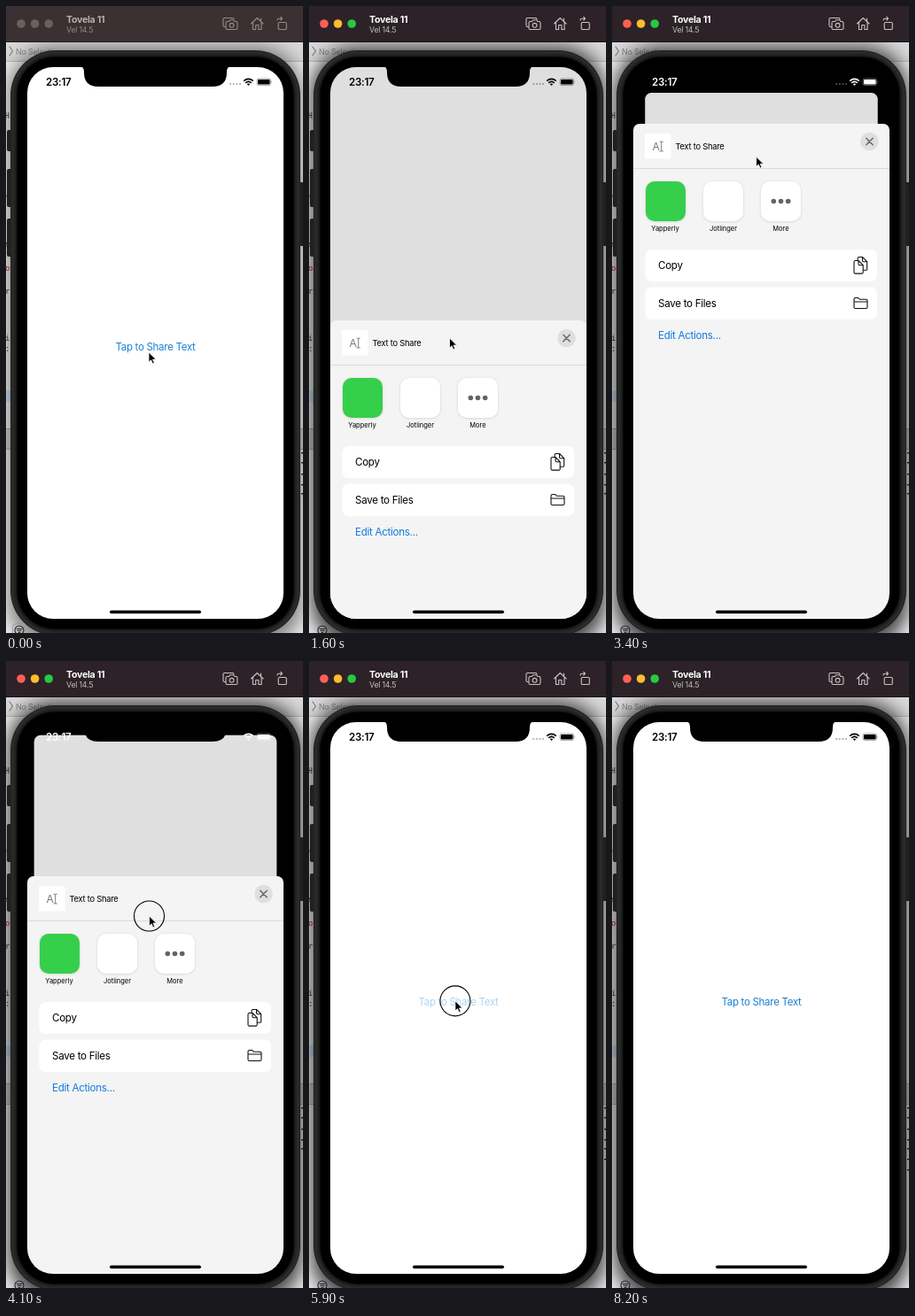
An HTML page for the animation above (8600 ms loop, 335x708 px).

```html
<!DOCTYPE html>
<html lang="en">
<head>
<meta charset="utf-8">
<title>Share sheet</title>
<style>
html, body { margin: 0; width: 100%; height: 100%; overflow: hidden; background: #ddd; }
svg { display: block; width: 335px; height: 708px; }
text { font-family: Inter, Roboto, sans-serif; letter-spacing: -.025em; }
.code text { font: 9px "DejaVu Sans Mono", monospace; fill: #333; }
.line { fill: none; stroke-width: 1.1; stroke-linejoin: round; stroke-linecap: round; }
.row { font-size: 11.6px; }
.label { font-size: 7.5px; text-anchor: middle; letter-spacing: 0; }
</style>
</head>
<body>
<svg viewBox="0 0 335 708">
  <defs>
    <clipPath id="screen"><rect x="24" y="69" width="289" height="623" rx="29"/></clipPath>
    <filter id="blur" x="-20%" y="-20%" width="140%" height="140%"><feGaussianBlur stdDeviation="10"/></filter>
    <filter id="soft" x="-20%" y="-20%" width="140%" height="140%"><feGaussianBlur stdDeviation="1.3"/></filter>
  </defs>

  <!-- editor behind the phone -->
  <g class="code">
    <rect width="335" height="708" fill="#efefef"/>
    <rect y="41" width="335" height="21" fill="#d8d8d8"/>
    <path d="M0 62.5H335" stroke="#bbb"/>
    <path d="M4 46l3.5 5-3.5 5" class="line" stroke="#777"/>
    <text x="11" y="55" style="font:9px Inter,sans-serif;fill:#888">No Selection</text>
    <text x="-1" y="127" style="font-size:8px">H</text>
    <text x="-1" y="219">t</text>
    <text x="-1" y="272">s</text>
    <text x="-1" y="299" style="fill:#c3201c">o</text>
    <text x="-1" y="325">r</text>
    <text x="-1" y="378">i</text>
    <text x="-1" y="390">:</text>
    <rect y="434" width="8" height="13" fill="#cfe0f2"/>
    <rect y="477" width="335" height="24" fill="#d2d2d2"/>
    <path d="M0 477.5H335M0 500.5H335" stroke="#aaa"/>
  </g>
  <rect id="shade" x="2" y="46" width="333" height="678" rx="52" filter="url(#blur)"/>
  <g id="logs" fill="#111"></g>
  <circle cx="15" cy="705" r="5" class="line" stroke="#222"/>
  <path d="M12.3 703.5h5.4M13 705.5h4M14 707.5h2" class="line" stroke="#222"/>
  <rect id="field" x="7.5" y="697.5" width="60" height="15" rx="4" fill="none" stroke="#999"/>

  <!-- phone body -->
  <g fill="#202020">
    <rect x="1" y="140" width="7" height="24" rx="2"/>
    <rect x="1" y="184" width="7" height="43" rx="2"/>
    <rect x="1" y="240" width="7" height="43" rx="2"/>
    <rect x="329" y="199" width="7" height="72" rx="2"/>
  </g>
  <rect x="5" y="50" width="327" height="661" rx="51" fill="#242424"/>
  <rect x="7.5" y="52.5" width="322" height="656" rx="48.5" fill="none" stroke="#2c2c2c" stroke-width="2"/>
  <rect x="12" y="57" width="313" height="647" rx="43" filter="url(#soft)"/>
  <rect x="13" y="58" width="311" height="645" rx="42"/>

  <g clip-path="url(#screen)">
    <rect x="24" y="69" width="289" height="623"/>
    <g id="card">
      <rect x="24" y="69" width="289" height="640" fill="#fff" id="page"/>
      <text id="button" x="168.5" y="389" text-anchor="middle" font-size="11.5">Tap to Share Text</text>
      <rect id="dim" x="24" y="69" width="289" height="640"/>
    </g>
    <g id="sheet">
      <rect x="24" width="289" height="720" rx="7" fill="#f4f4f4"/>
      <rect x="37" y="11" width="29.5" height="28.5" rx="1" fill="#fff"/>
      <text x="45.5" y="30" font-size="12" fill="#777">A</text>
      <path d="M54 20q1.7 0 1.7 1v9q0 1-1.7 1M57.4 20q-1.7 0-1.7 1M57.4 31q-1.7 0-1.7-1" class="line" stroke="#888"/>
      <text x="71.5" y="28.5" font-size="9.3">Text to Share</text>
      <circle cx="290.5" cy="20" r="10.3" fill="#dfdfe1"/>
      <path d="M286.8 16.3l7.4 7.4m0-7.4l-7.4 7.4" class="line" stroke="#66666a" style="stroke-width:1.5"/>
      <path d="M24 50.5H313" stroke="#d3d3d5" stroke-width=".8"/>
      <g opacity=".1" filter="url(#soft)">
        <rect x="37.5" y="65" width="46" height="46" rx="10.5"/>
        <rect x="102.5" y="65" width="46" height="46" rx="10.5"/>
        <rect x="167.5" y="65" width="46" height="46" rx="10.5"/>
      </g>
      <rect x="38" y="65" width="45" height="45" rx="10" fill="#35cf4c"/>
      <rect x="103" y="65" width="45" height="45" rx="10" fill="#fff"/>
      <rect x="168" y="65" width="45" height="45" rx="10" fill="#fff"/>
      <g fill="#636366">
        <circle cx="182.3" cy="87.5" r="2.8"/><circle cx="190.5" cy="87.5" r="2.8"/><circle cx="198.7" cy="87.5" r="2.8"/>
      </g>
      <text class="label" x="60" y="120.5">Yapperly</text>
      <text class="label" x="125.5" y="120.5">Jotlinger</text>
      <text class="label" x="190.5" y="120.5">More</text>
      <rect x="37.5" y="142" width="261.5" height="36" rx="7" fill="#fff"/>
      <rect x="37.5" y="184.5" width="261.5" height="36.5" rx="7" fill="#fff"/>
      <text class="row" x="52" y="164">Copy</text>
      <text class="row" x="52" y="206.5">Save to Files</text>
      <text class="row" x="52" y="243.3" fill="#1279e0">Edit Actions...</text>
      <g class="line" stroke="#111">
        <path d="M278.5 150.5h4l5.2 5.2v8.2q0 1.4-1.4 1.4h-7.8q-1.4 0-1.4-1.4v-12q0-1.4 1.4-1.4ZM282.5 150.5v4q0 1.2 1.2 1.2h4"/>
        <path d="M274.4 154.5h3.6l5.2 5.2v8q0 1.4-1.4 1.4h-7.4q-1.4 0-1.4-1.4v-11.8q0-1.4 1.4-1.4ZM278 154.5v4q0 1.2 1.2 1.2h4" fill="#fff"/>
        <path d="M273 207v-9q0-1.5 1.5-1.5h3.3l1.5 1.7h7.2q1.5 0 1.5 1.5v7.3q0 1.5-1.5 1.5h-12q-1.5 0-1.5-1.5ZM273 201h15"/>
      </g>
    </g>
  </g>

  <path d="M82 68q6 0 6 6v1q0 16 16 16h129q16 0 16-16v-1q0-6 6-6Z"/>
  <g id="status">
    <text x="45" y="89.8" font-size="11.6" font-weight="600">23:17</text>
    <g opacity=".33">
      <circle cx="253.2" cy="88" r="1.1"/><circle cx="256.8" cy="88" r="1.1"/><circle cx="260.4" cy="88" r="1.1"/><circle cx="264" cy="88" r="1.1"/>
    </g>
    <g class="line" stroke="currentColor" style="stroke-width:1.6;stroke-linecap:butt">
      <path d="M268.2 84.6q5.3-4.4 10.6 0M270.2 86.8q3.3-2.7 6.6 0"/>
    </g>
    <path d="M271.8 88.2q1.7-1.2 3.4 0l-1.7 1.9Z"/>
    <rect x="283" y="82" width="15.6" height="7.6" rx="2.2" fill="none" stroke="currentColor" stroke-width=".7" opacity=".5"/>
    <rect x="284" y="83" width="13.6" height="5.6" rx="1.4"/>
    <path d="M299.5 84.5q1.3 1.3 0 2.6Z" opacity=".6"/>
  </g>
  <rect x="117" y="682.6" width="103" height="3.5" rx="1.75"/>

  <!-- window title bar -->
  <rect id="bar" width="335" height="41"/>
  <path d="M0 40.5H335" stroke="#000" stroke-opacity=".45"/>
  <g id="lights"><circle cx="17" cy="20" r="4.8"/><circle cx="32.6" cy="20" r="4.8"/><circle cx="48.2" cy="20" r="4.8"/></g>
  <g id="caption">
    <text x="68" y="18.5" font-size="10.6" font-weight="700" fill="#fff">Tovela 11</text>
    <text x="68" y="30" font-size="8.8" fill="#c3bbbe">Vel 14.5</text>
    <g class="line" stroke="#c9c2c4">
      <path d="M247.5 23.5h-1q-1.5 0-1.5-1.5v-7q0-1.5 1.5-1.5h9q1.5 0 1.5 1.5"/>
      <path d="M249.5 17.5h2l1.2-1.7h4l1.2 1.7h1.6q1.5 0 1.5 1.5v6q0 1.5-1.5 1.5h-10q-1.5 0-1.5-1.5v-6q0-1.5 1.5-1.5Z"/>
      <circle cx="254.6" cy="21.8" r="2.4"/>
      <path d="M276.5 20l6.8-6.5 6.8 6.5M278.5 18.5V26.5h3.2v-5h3.2v5h3.2v-8M287.5 17v-3"/>
      <path d="M308.5 18.5h6.5q1.3 0 1.3 1.3v5.4q0 1.3-1.3 1.3h-6.5q-1.3 0-1.3-1.3v-5.4q0-1.3 1.3-1.3ZM306 16q0-1.8 1.8-1.8h3.7M309.8 12.4l1.8 1.8-1.8 1.8"/>
    </g>
  </g>

  <g id="cursor">
    <circle id="touch" r="17" fill="none" stroke="#000" stroke-width="1.1"/>
    <path d="M0 0V11.2L2.6 8.8l1.8 4.1 1.9-.8-1.8-4H8.2Z" stroke="#fff" stroke-width=".8"/>
  </g>
</svg>
<script>
const LOOP = 8600, STEP = 100;
const CLOSED = 700, HALF = 355, FULL = 133;
const $ = id => document.getElementById(id);
const set = (id, attrs) => { for (const k in attrs) $(id).setAttribute(k, attrs[k]); };
const clamp = v => Math.min(1, Math.max(0, v));

const lin = u => u;
const out = u => 1 - (1 - u) ** 3;
const smooth = u => u * u * (3 - 2 * u);

// time, top of the sheet, easing into it
const sheetKeys = [
  [0, CLOSED], [600, CLOSED], [1100, HALF, out], [1800, HALF], [2100, 170], [2400, FULL, out],
  [3800, FULL], [4100, 243], [4300, 330], [4700, CLOSED, smooth],
  [6000, CLOSED], [6500, HALF, out], [7400, HALF], [7900, CLOSED, smooth]
];
// time, coordinate, easing into it
const xKeys = [[0, 161], [1100, 160], [1600, 158.5], [1800, 159], [2200, 166], [3000, 166],
  [3600, 161.5, smooth], [4100, 161.5], [4700, 164], [5700, 164], [6500, 170, smooth],
  [6900, 239], [7300, 291, out], [7500, 291], [7900, 345, smooth]];
const yKeys = [[0, 391], [500, 391], [1600, 375, smooth], [1800, 370], [2100, 184], [2400, 146, out],
  [3000, 148], [3600, 178, smooth], [3800, 178], [4100, 288], [4300, 375], [4600, 392, out],
  [5200, 379, smooth], [5700, 384], [6900, 383], [7300, 375, smooth], [7500, 375], [7900, 395]];
const presses = [[300, 500], [1700, 2200], [3600, 4400], [5800, 6000], [7300, 7500]];

function at(keys, t) {
  const i = keys.findIndex(k => k[0] > t);
  if (i < 0) return keys[keys.length - 1][1];
  const [t0, a] = keys[i - 1], [t1, b, ease = lin] = keys[i];
  return a + (b - a) * ease((t - t0) / (t1 - t0));
}

const logs = [504, 515, 528, 540, 550, 562, 574].map(y => {
  const dash = document.createElementNS("http://www.w3.org/2000/svg", "rect");
  for (const [k, v] of Object.entries({ x: 333, y, width: 2, height: 1.4 })) dash.setAttribute(k, v);
  return $("logs").appendChild(dash);
});
const lights = [...$("lights").children];
const lightFills = ["#ff5f57", "#febc2e", "#28c840"];

function draw(t) {
  const active = t >= 100;
  const top = at(sheetKeys, t);
  const shown = clamp((692 - top) / (692 - HALF));
  const lift = clamp((HALF - top) / (HALF - FULL));
  const pressed = presses.some(([a, b]) => t >= a && t < b);

  set("bar", { fill: active ? "#2c2227" : "#3b3032" });
  set("caption", { opacity: active ? 1 : .62 });
  set("shade", { opacity: active ? .7 : .45 });
  set("field", { opacity: active ? 0 : 1 });
  lights.forEach((l, i) => l.setAttribute("fill", active ? lightFills[i] : "#6a6062"));
  const lines = t >= 8000 ? 7 : t >= 4800 ? 6 : 5;
  logs.forEach((l, i) => l.setAttribute("opacity", i < lines ? 1 : 0));

  set("sheet", { transform: `translate(0 ${top})` });
  const scale = 1 - .092 * lift ** .8;
  set("card", { transform: `translate(168.5 ${69 + 29 * lift}) scale(${scale}) translate(-168.5 -69)` });
  set("page", { rx: lift ? 8 : 0 });
  set("dim", { opacity: .125 * shown, rx: lift ? 8 : 0 });
  const tapped = pressed && shown === 0 && top === CLOSED;
  set("button", { fill: shown > .05 ? "#8b8b8b" : "#1a80d2", opacity: tapped ? .35 : 1 });
  const ink = lift > .25 ? "#fff" : "#000";
  set("status", { fill: ink, color: ink });

  set("cursor", {
    transform: `translate(${at(xKeys, t)} ${at(yKeys, t)})`,
    visibility: t < 8000 ? "visible" : "hidden"
  });
  set("touch", { opacity: pressed ? 1 : 0 });
}

const start = performance.now();
function tick() {
  const t = (performance.now() - start) % LOOP;
  draw(Math.floor(t / STEP) * STEP);
  requestAnimationFrame(tick);
}
tick();
</script>
</body>
</html>
```
